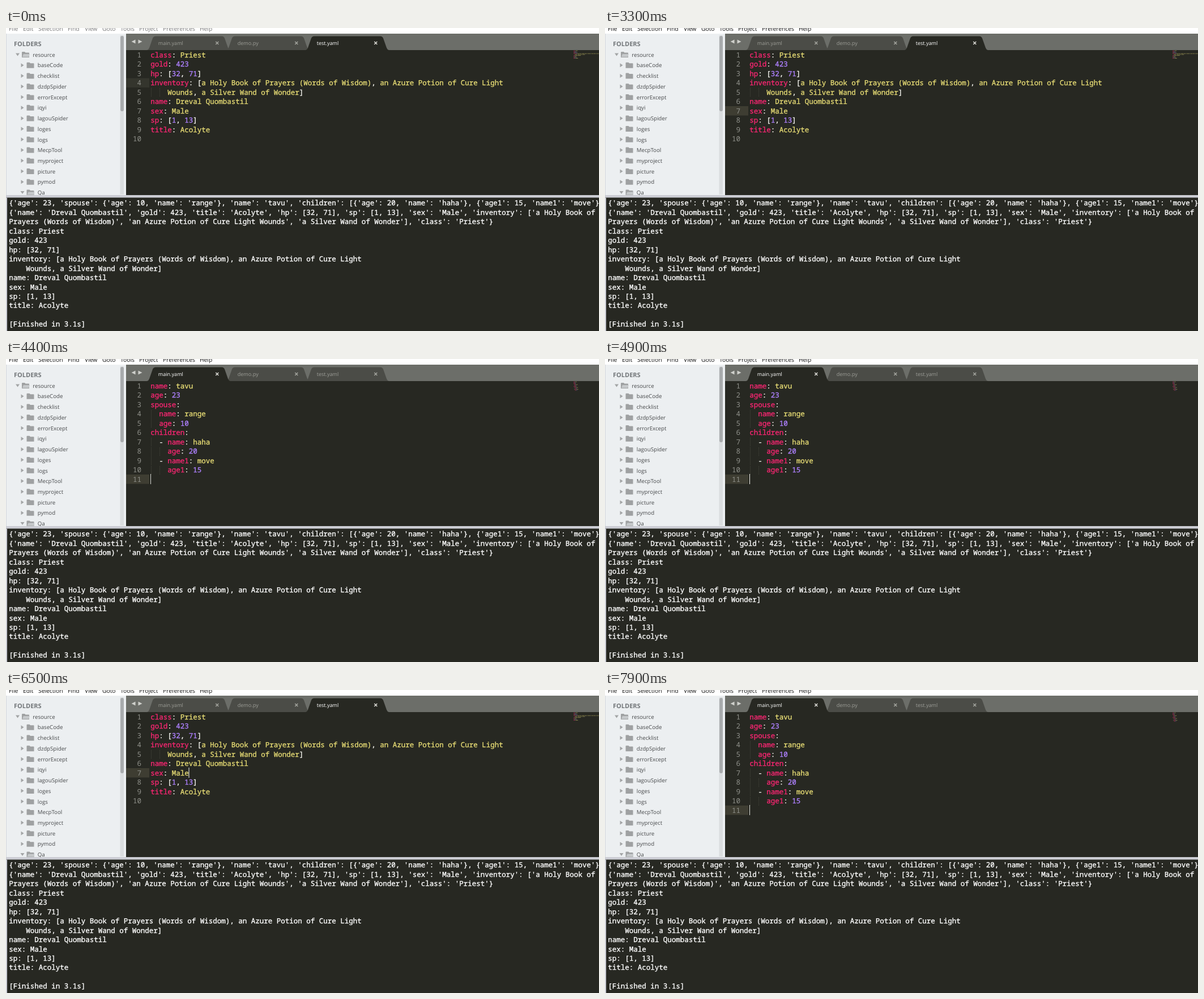
An HTML page with a canvas for the animation above (8000 ms loop, 1047 px wide and 535 px high).

```html
<!DOCTYPE html>
<html lang="en">
<head>
<meta charset="utf-8">
<title>Editor tabs</title>
<style>
  html, body { margin: 0; width: 100%; height: 100%; overflow: hidden; background: #272822; }
  canvas { display: block; }
</style>
</head>
<body>
<canvas id="stage" width="1047" height="535"></canvas>
<script>
const ctx = document.getElementById('stage').getContext('2d');
ctx.textRendering = 'geometricPrecision';

const LOOP = 8000, CHAR = 7.5, LINE = 16.5;
const MONO = '12.5px "Noto Sans Mono", monospace';
const ui = (size, weight = 400) => `${weight} ${size}px "Open Sans", sans-serif`;
const BG = '#272822', WHITE = '#f8f8f2', PINK = '#f92672', YELLOW = '#e6db74', PURPLE = '#ae81ff';

const menu = [['File', 5], ['Edit', 30], ['Selection', 57], ['Find', 109], ['View', 139],
  ['Goto', 170], ['Tools', 202], ['Project', 235], ['Preferences', 277], ['Help', 342]];
const folders = ['resource', 'baseCode', 'checklist', 'dzdpSpider', 'errorExcept', 'iqyi', 'lagouSpider',
  'loges', 'logs', 'MecpTool', 'myproject', 'picture', 'pymod', 'Qa'];
const tabs = ['main.yaml', 'demo.py', 'test.yaml'];
const MAIN = 0, TEST = 2;

const testFile = `class: Priest
gold: 423
hp: [32, 71]
inventory: [a Holy Book of Prayers (Words of Wisdom), an Azure Potion of Cure Light
    Wounds, a Silver Wand of Wonder]
name: Dreval Quombastil
sex: Male
sp: [1, 13]
title: Acolyte
`;
const mainFile = `name: tavu
age: 23
spouse:
  name: range
  age: 10
children:
  - name: haha
    age: 20
  - name1: move
    age1: 15
`;
const output = `{'age': 23, 'spouse': {'age': 10, 'name': 'range'}, 'name': 'tavu', 'children': [{'age': 20, 'name': 'haha'}, {'age1': 15, 'name1': 'move'}
{'name': 'Dreval Quombastil', 'gold': 423, 'title': 'Acolyte', 'hp': [32, 71], 'sp': [1, 13], 'sex': 'Male', 'inventory': ['a Holy Book of
Prayers (Words of Wisdom)', 'an Azure Potion of Cure Light Wounds', 'a Silver Wand of Wonder'], 'class': 'Priest'}
${testFile}
[Finished in 3.1s]`.split('\n');

// Caret opacity from each moment on.
const caretSteps = [[0, 0], [800, 1], [1200, .67], [1300, .33], [1400, 0], [1900, 1], [2300, .5], [2400, 0],
  [2800, .5], [2900, 1], [3200, .5], [3300, 0], [3500, 1], [3800, .5], [3900, 0], [4000, .5], [4100, 1],
  [4400, .85], [4500, 0], [4800, .5], [4900, 1], [5300, .5], [5400, 0], [5900, .5], [6000, 1],
  [6800, .67], [6900, .33], [7000, 0], [7400, 1], [7900, .9]];

function tokenize(line) {
  const tokens = [];
  let col = 0;
  const add = (text, color) => {
    if (text.trim()) tokens.push({ text, color, col });
    col += text.length;
  };
  const [, lead, key, rest] = line.match(/^([\s-]*)(\w+(?=:))?(.*)$/);
  add(lead, WHITE);
  if (key) add(key, PINK);
  for (const part of rest.split(/([:\[\],])/)) {
    add(part, /^[:\[\],]$/.test(part) ? WHITE : /^\s*\d+$/.test(part) ? PURPLE : YELLOW);
  }
  return tokens;
}
const parse = file => file.split('\n').map(line => ({ indent: line.search(/\S/), tokens: tokenize(line) }));
const documents = { [MAIN]: parse(mainFile), [TEST]: parse(testFile) };

function rect(x, y, w, h, color) {
  ctx.fillStyle = color;
  ctx.fillRect(x, y, w, h);
}
function label(text, x, y, font, color, align = 'left') {
  ctx.font = font;
  ctx.fillStyle = color;
  ctx.textAlign = align;
  ctx.fillText(text, x, y);
}
// Code is set slightly heavier than the regular weight.
function code(text, x, y, color, align) {
  label(text, x, y, MONO, color, align);
  ctx.strokeStyle = color;
  ctx.lineWidth = .35;
  ctx.strokeText(text, x, y);
}
function shape(path, color) {
  ctx.fillStyle = color;
  ctx.fill(new Path2D(path));
}
const mix = (a, b, p) => `rgb(${a.map((v, i) => Math.round(v + (b[i] - v) * p))})`;

function drawMenu(focused) {
  rect(0, 0, 1047, 10, '#fff');
  for (const [text, x] of menu) label(text, x, 5.3, ui(10.3), focused ? '#111' : '#777');
}

function drawSidebar() {
  rect(0, 10, 212, 286, '#eceff1');
  rect(0, 10, 1, 286, '#d5d8dc');
  label('FOLDERS', 14, 32, ui(11, 700), '#73777a');
  folders.forEach((name, i) => {
    const x = i ? 29 : 20.5, y = 47 + 18.73 * i, open = !i || name === 'Qa';
    shape(open ? `M${x - 3.5} ${y - 2.5}h7l-3.5 5z` : `M${x - 2.5} ${y - 3.5}v7l5 -3.5z`, '#a3a5a6');
    const f = x + 7.5;
    shape(`M${f} ${y + 5}v-9q0 -1 1 -1h4l1.5 1.5h5.5q1 0 1 1v7.5z`, '#9fa1a2');
    if (open) shape(`M${f + 1} ${y + 4}l1.8 -5h11l-1.5 5z`, '#c6c9cb');
    label(name, x + 26.7, y + 3.7, ui(9.7), '#484a4c');
  });
  rect(201.5, 13, 6.5, 281, '#dadddf');
  ctx.fillStyle = '#a8abad';
  ctx.beginPath();
  ctx.roundRect(202, 14, 6, 133, 3);
  ctx.fill();
}

function drawTab(index, activity) {
  const l = 249 + 140 * index, r = l + 147;
  shape(`M${l} 39Q${l + 3} 38 ${l + 4} 35L${l + 10} 18Q${l + 11.5} 14.5 ${l + 15} 14.5` +
    `H${r - 15}Q${r - 11.5} 14.5 ${r - 10} 18L${r - 4} 35Q${r - 3} 38 ${r} 39z`,
    mix([75, 76, 71], [39, 40, 34], activity));
  label(tabs[index], l + 19.7, 30, ui(9.1), mix([155, 156, 150], [255, 255, 255], activity));
  ctx.strokeStyle = mix([165, 166, 160], [225, 225, 220], activity);
  ctx.lineWidth = 1.5;
  ctx.stroke(new Path2D(`M${l + 121.3} 24l5 5m0 -5l-5 5`));
}

function drawTabs(active, fade) {
  rect(212, 10, 835, 29, '#6c6e69');
  shape('M228.5 20.5v7l-7 -3.5z', '#cfd0cc');
  shape('M233.5 20.5v7l7 -3.5z', '#cfd0cc');
  for (const i of [2, 1, 0]) {
    if (i !== active) drawTab(i, i === MAIN + TEST - active ? 1 - fade : 0);
  }
  drawTab(active, fade);
}

function drawEditor(lines, row, focused) {
  rect(212, 39, 835, 257, BG);
  rect(212, 39 + LINE * (row - 1), 41, LINE, focused ? '#3e3d32' : '#34352d');
  lines.forEach(({ indent, tokens }, i) => {
    const top = 39 + LINE * i, base = top + 12.6;
    label(i + 1, 239, base, MONO, '#8f908a', 'right');
    for (let col = 0; col < indent; col += 2) {
      for (let y = 1; y < LINE; y += 2) rect(256 + col * CHAR, Math.round(top) + y, 1, 1, '#45463d');
    }
    for (const { text, color, col } of tokens) {
      code(text, 255.3 + col * CHAR, base, color);
      // Minimap
      ctx.globalAlpha = .45;
      for (const word of text.matchAll(/\S+/g)) {
        rect(1002 + (col + word.index) * .56, 39.8 + i * 1.65, word[0].length * .56, 1, color);
      }
      ctx.globalAlpha = 1;
    }
  });
}

function drawCaret(col, row, alpha) {
  ctx.globalAlpha = alpha;
  rect(255 + col * CHAR, 38 + LINE * (row - 1), 1, 18, WHITE);
  ctx.globalAlpha = 1;
}

function drawOutput() {
  rect(0, 295, 1047, 5, '#cccdd4');
  rect(0, 299.5, 1047, 236, BG);
  rect(0, 299.5, 2, 236, '#cccdd4');
  output.forEach((line, i) => code(line, 5.2, 313.2 + 16.48 * i, '#fff'));
}

function draw(t) {
  const focused = t >= 800;
  const active = (t >= 3500 && t < 6300) || t >= 7400 ? MAIN : TEST;
  const switched = t >= 7400 ? 7400 : t >= 6300 ? 6300 : 0;
  const fade = switched ? Math.min(1, (Math.floor((t - switched) / 100) + 1) / 3) : 1;
  const row = active === MAIN ? 11 : focused ? 7 : 4;
  const caret = caretSteps.findLast(([at]) => at <= t)[1];

  drawMenu(focused);
  drawSidebar();
  drawTabs(active, fade);
  drawEditor(documents[active], row, focused);
  drawCaret(active === MAIN ? 0 : 9, row, caret);
  drawOutput();
}

function tick() {
  draw(performance.now() % LOOP);
  requestAnimationFrame(tick);
}
tick();
</script>
</body>
</html>
```
